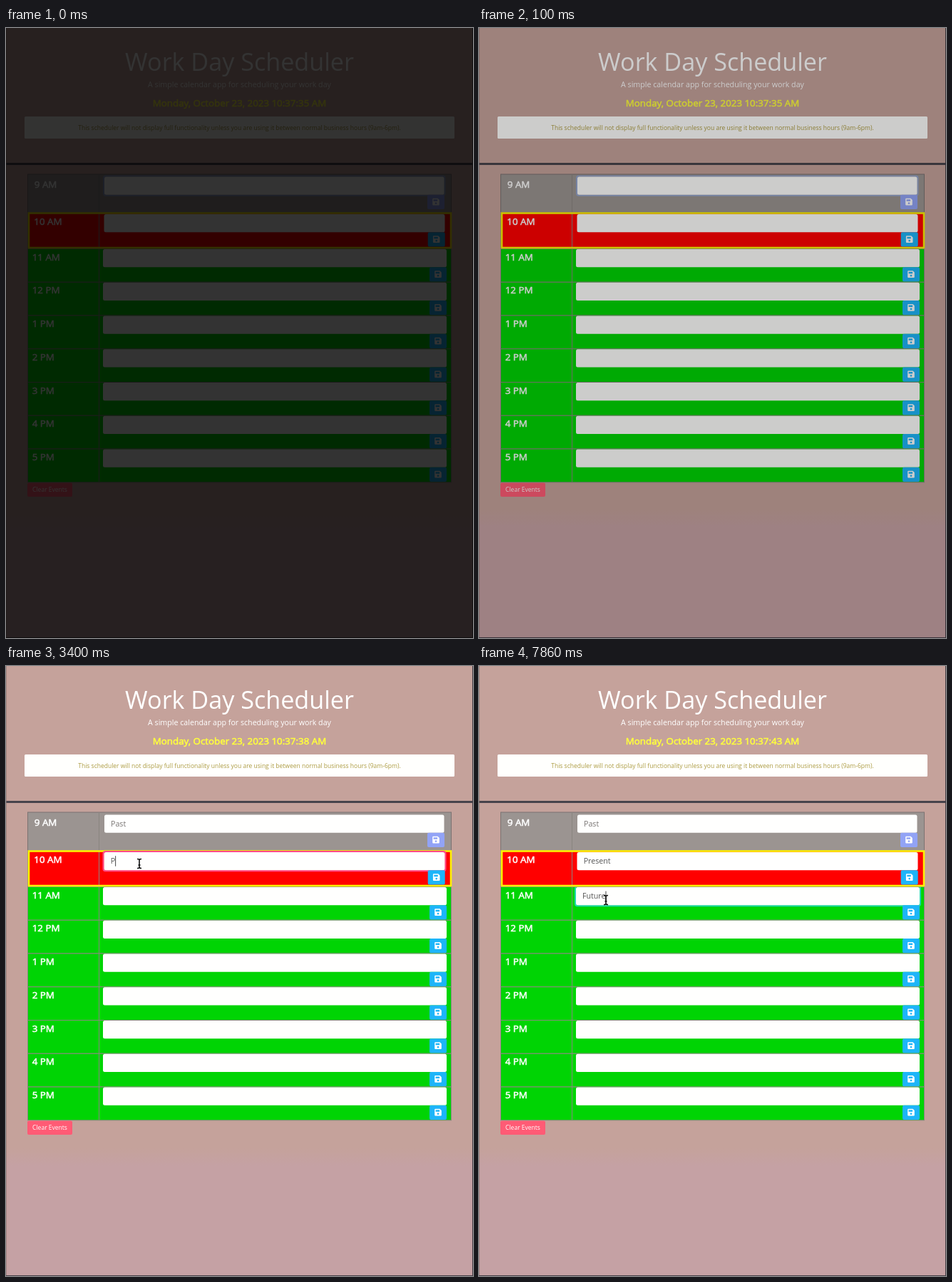
Animation, 655 px wide and 855 px high, one loop 8000 ms. Source, as an HTML page:

```html
<!DOCTYPE html>
<html lang="en">
<head>
<meta charset="utf-8">
<title>Work Day Scheduler</title>
<style>
html, body { margin: 0; width: 100%; height: 100%; overflow: hidden; background: #000; }
svg { display: block; width: 655px; height: 855px; font: 10.67px "Open Sans", sans-serif; }
.mid { text-anchor: middle; }
.bold { font-size: 13.33px; stroke-width: .55px; }
</style>
</head>
<body>
<svg id="stage" viewBox="0 0 655 855"></svg>
<script>
const LOOP = 8000;
const stage = document.getElementById('stage');

const rect = (x, y, w, h, fill, more = '') =>
  `<rect x="${x}" y="${y}" width="${w}" height="${h}" fill="${fill}" ${more}/>`;
const text = (x, y, fill, str, more = '') =>
  `<text x="${x}" y="${y}" fill="${fill}" ${more}>${str}</text>`;

const saveButton = (x, y, fill) => rect(x, y, 24, 20.2, fill, 'rx="2"') +
  `<path transform="translate(${x + 7.2} ${y + 5})" fill="#fff" fill-rule="evenodd"
    d="M1 0H7.3L9.6 2.3V8.8Q9.6 9.8 8.6 9.8H1Q0 9.8 0 8.8V1Q0 0 1 0Z
       M1.4 1.5V4H6.9V1.5ZM4.8 5.4a1.4 1.4 0 1 0 .01 0Z"/>`;

// Row geometry: the past and present rows have wider borders than the future ones
const PITCH = 46.75;
const rows = ['9 AM', '10 AM', '11 AM', '12 PM', '1 PM', '2 PM', '3 PM', '4 PM', '5 PM'].map((label, i) => {
  if (i === 0) return { label, top: 205, h: 53.5, fill: '#9b9491', lx: 39.8, ly: 223.7,
    x: 138, y: 208.5, w: 476.5, bx: 591, btn: '#92a3f6' };
  if (i === 1) return { label, top: 258.5, h: 51, fill: '#f00', lx: 39.3, ly: 276.2,
    x: 137.5, y: 261, w: 478, bx: 591.7, btn: '#1db5f9' };
  const d = (i - 2) * PITCH;
  return { label, top: 309.5 + d, h: PITCH, fill: '#00d404', lx: 36.7, ly: 325.6 + d,
    x: 136, y: 310 + d, w: 482, bx: 594, btn: '#1db5f9' };
});

const fields = [
  { word: 'Past', x: 147, y: 224.8, color: '#7a7674', ring: '#93a3cc',
    times: [-600, 360, 760, 960, 1160] },
  { word: 'Present', x: 146.7, y: 277, color: '#555', ring: '#ff4a8a',
    times: [2660, 3330, 3600, 3830, 4600, 4700, 4800, 4900] },
  { word: 'Future', x: 145, y: 326.4, color: '#555', ring: '#1fd8b0',
    times: [6400, 6900, 7160, 7400, 7530, 7660, 7800] }
];

const drawRow = (r, i) =>
  rect(30.5, r.top, 594, r.h, r.fill, `stroke="${i ? '#8a8a80' : '#7b7372'}"`) +
  rect(130, r.top, 1, r.h, '#8a8580') +
  (i === 1 ? rect(32, 259.5, 592, 48.5, 'none', 'stroke="#fff200" stroke-width="2.6"') : '') +
  text(r.lx, r.ly, '#fff', r.label, 'class="bold" stroke="#fff"') +
  (fields[i] ? rect(r.x - 1, r.y - 1, r.w + 2, 27.3, 'none',
    `id="ring${i}" rx="3" stroke="${fields[i].ring}" stroke-width="2"`) : '') +
  rect(r.x, r.y, r.w, 25.3, '#fffffe', 'rx="2.5"') +
  saveButton(r.bx, r.y + 25.3, r.btn);

// The present row goes last so that its yellow border stays on top
const order = [0, 2, 3, 4, 5, 6, 7, 8, 1];

stage.innerHTML =
  `<linearGradient id="bg" x2="0" y2="1">
    <stop offset=".79" stop-color="#c5a29b"/><stop offset=".82" stop-color="#c5a1a4"/>
  </linearGradient>` +
  rect(0, 0, 655, 855, 'url(#bg)') +
  rect(0, 189, 655, 3, '#47434b') +
  text(327.5, 59.8, '#fff', 'Work Day Scheduler', 'class="mid" font-size="34.13"') +
  text(327.5, 82.7, '#fff', 'A simple calendar app for scheduling your work day', 'class="mid"') +
  text(327.5, 110.4, '#ffff3c', '', 'id="clock" class="mid bold" stroke="#ffff3c"') +
  rect(26, 124, 603, 31, '#fffffd', 'rx="1.5"') +
  text(327.5, 142.8, '#ad9c43', 'This scheduler will not display full functionality unless you are using it between normal business hours (9am-6pm).', 'class="mid" font-size="8.53"') +
  order.map(i => drawRow(rows[i], i)).join('') +
  fields.map((f, i) => text(f.x, f.y, f.color, '', `id="word${i}"`)).join('') +
  rect(30, 637.5, 63, 19.5, '#ff5b75', 'rx="2"') +
  text(61.5, 650.2, '#fff', 'Clear Events', 'class="mid" font-size="8.53"') +
  rect(0, 0, .6, 855, '#8d7672') + rect(654, 0, 1, 855, '#453f47') + rect(0, 854, 655, 1, '#453f47') +
  rect(0, 0, 1, 14.5, '#444', 'id="caret"') +
  `<path id="arrow" d="M0 0V9L2 7.2L3.4 10.4L4.8 9.8L3.5 6.7H6Z" fill="#124a50" stroke="#9cc" stroke-width=".4"/>
   <path id="beam" d="M-3-6.5Q0-6.5 0-5Q0-6.5 3-6.5M0-5V5M-3 6.5Q0 6.5 0 5Q0 6.5 3 6.5M-1.5 2H1.5" fill="none" stroke="#111" stroke-width="1.6"/>` +
  rect(0, 0, 655, 855, '#000', 'id="shade"');

const el = id => document.getElementById(id);
const show = (node, on) => node.setAttribute('visibility', on ? 'visible' : 'hidden');

// Pointer stops: time, x, y
const path = [[1860, 184, 222], [2260, 184, 295], [2660, 187, 277],
  [5800, 187, 277], [6200, 181, 343], [6600, 178, 328]];

function pointerAt(t) {
  const n = path.findIndex(p => p[0] > t);
  if (n < 0) return path[path.length - 1].slice(1);
  const [a, b] = [path[n - 1], path[n]];
  const k = (t - a[0]) / (b[0] - a[0]), e = k * k * (3 - 2 * k);
  return [a[1] + (b[1] - a[1]) * e, a[2] + (b[2] - a[2]) * e];
}

function drawPointer(t) {
  const seen = t >= path[0][0];
  const [x, y] = seen ? pointerAt(t) : [0, 0];
  const inField = rows.some(r => y > r.y && y < r.y + 25.3);
  show(el('arrow'), seen && !inField);
  show(el('beam'), seen && inField);
  for (const id of ['arrow', 'beam']) el(id).setAttribute('transform', `translate(${x} ${y})`);
}

function drawFields(t) {
  const focus = fields.filter(f => f.times[0] <= t).length - 1;
  fields.forEach((f, i) => {
    const past = f.times.filter(s => s <= t);
    const word = el('word' + i);
    word.textContent = f.word.slice(0, Math.max(0, past.length - 1));
    show(el('ring' + i), i === focus);
    if (i !== focus) return;
    const caret = el('caret');
    const width = word.textContent ? word.getComputedTextLength() : 0;
    caret.setAttribute('x', f.x + width);
    caret.setAttribute('y', f.y - 10.8);
    show(caret, Math.floor((t - past[past.length - 1]) / 500) % 2 === 0);
  });
}

function draw(t) {
  const seconds = 35 + Math.floor((t + 150) / 1000);
  el('clock').textContent = `Monday, October 23, 2023 10:37:${seconds} AM`;
  const step = [30, 60, 100, 130].filter(s => s <= t).length;
  el('shade').setAttribute('opacity', .8 - step * .2);
  drawFields(t);
  drawPointer(t);
}

const start = performance.now();
function tick() {
  draw((performance.now() - start) % LOOP);
  requestAnimationFrame(tick);
}
tick();
</script>
</body>
</html>
```
